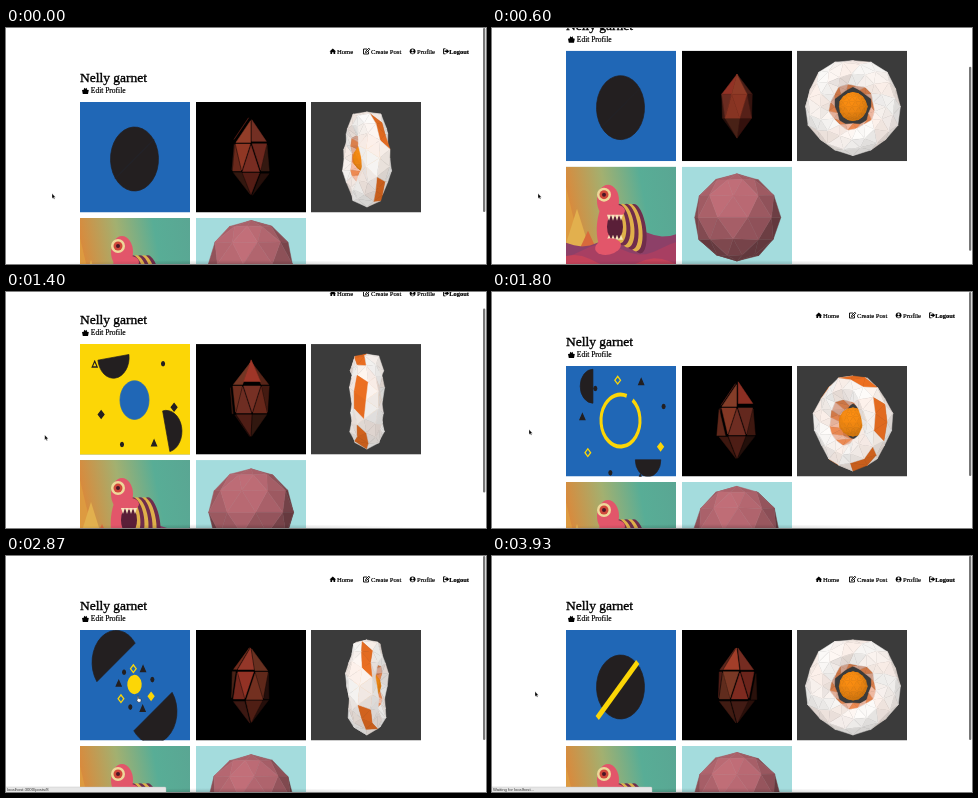
Write an HTML page with a canvas that moves like this. It is 480 px wide and 236 px high and loops after 4070 ms.

```html
<!DOCTYPE html>
<html lang="en">
<head>
<meta charset="utf-8">
<title>Profile page</title>
<style>
  html, body { margin: 0; width: 100%; height: 100%; overflow: hidden; background: #fff; }
  canvas, svg { position: absolute; left: 0; top: 0; }
  text { font: 6.6px "Liberation Serif", serif; stroke: #000; stroke-width: .2px; }
  .title { font-size: 13.5px; stroke-width: .35px; }
  .edit { font-size: 7.5px; }
  .bold { font-weight: bold; font-size: 6.4px; }
  .status { font: 4.2px "Liberation Sans", sans-serif; stroke: none; fill: #333; }
</style>
</head>
<body>
<canvas id="view" width="480" height="236"></canvas>
<svg width="480" height="236" viewBox="0 0 480 236">
  <defs>
    <radialGradient id="shade">
      <stop offset="0" stop-opacity=".2"/>
      <stop offset="1" stop-opacity="0"/>
    </radialGradient>
  </defs>
  <g id="page">
    <path d="M323.500 23.500l3.300-3 3.300 3h-.9V26h-1.700v-1.800h-1.400V26h-1.700v-2.500z"/>
    <text x="331" y="25.6">Home</text>
    <path d="M361 21h-3.500v5h5v-2.500M359.500 24.500l.3-1.300 3-3 1 1-3 3z" fill="none" stroke="#000" stroke-width=".9"/>
    <text x="365" y="25.6">Create Post</text>
    <circle cx="406.600" cy="23.300" r="2.900"/>
    <circle cx="406.600" cy="22.300" r="1.100" fill="#fff"/>
    <path d="M404.800 25q1.800-1.800 3.600 0-1.800 1.200-3.600 0" fill="#fff"/>
    <text x="411" y="25.6">Profile</text>
    <path d="M439.500 20.800h-2v5h2" fill="none" stroke="#000" stroke-width=".9"/>
    <path d="M438.500 22.500h2v-1.700l2.700 2.500-2.700 2.500v-1.700h-2z"/>
    <text class="bold" x="443.300" y="25.6">Logout</text>
    <text class="title" x="74" y="53.5">Nelly garnet</text>
    <path d="M76 62l1.800-.3.300-2 1.300 1 1.300-1 .3 2 1.800.3-.8 4h-5.200z"/>
    <text class="edit" x="84.800" y="65.3">Edit Profile</text>
  </g>
  <ellipse cx="228" cy="237" rx="200" ry="5" fill="url(#shade)"/>
  <rect id="thumb" x="477" width="2.300" height="184" rx="1.100" fill="#777"/>
  <g id="bar">
    <rect x="-1" y="231" width="161" height="6" rx="1" fill="#e6e6e6" stroke="#bbb" stroke-width=".4"/>
    <text id="status" class="status" x="1" y="235.200"></text>
  </g>
  <path id="arrow" d="M0-2.500v5l1.200-1 .8 1.700.8-.4-.8-1.600h1.500z" stroke="#fff" stroke-width=".3"/>
  <path id="hand" d="M-1.500-3h1v2.500l2.500.5v2l-.6 1.200h-2.300l-1.600-2.200.9-.4z" fill="#fff" stroke="#222" stroke-width=".5"/>
</svg>
<script>
const LOOP = 4070, FREEZE = 3740, SIDE = 110.5;
const YELLOW = '#fcd606', BLUE = '#2067b6', DARK = '#231f20';
const { sin, cos, PI, hypot, min, max } = Math, TAU = 2 * PI, DEG = PI / 180;
const $ = id => document.getElementById(id);
const ctx = $('view').getContext('2d');

const ramp = (t, from, to) => min(1, max(0, (t - from) / (to - from)));
const ease = (t, from, to) => { const f = ramp(t, from, to); return f * f * (3 - 2 * f); };
const random = n => { const v = sin(n * 127.1) * 43758.5; return v - Math.floor(v); };

// ---- Low-poly solids ----
function mesh(nu, nv, point, tint) {
  const tris = [];
  for (let j = 0; j < nv; j++) for (let i = 0; i < nu; i++) {
    const at = (a, b) => point(TAU * (i + a + (j + b) / 2) / nu, j + b);
    const color = tint(i, j);
    tris.push({ p: [at(0, 0), at(1, 0), at(0, 1)], color },
              { p: [at(1, 0), at(1, 1), at(0, 1)], color });
  }
  return tris;
}

function ball(r, nu, nv, wobble, color) {
  return mesh(nu, nv, (a, j) => {
    const b = PI * j / nv, q = r * (1 + wobble * sin(3 * a + 5 * b) * sin(b));
    return [q * sin(b) * cos(a), -q * cos(b), q * sin(b) * sin(a)];
  }, () => color);
}

function drawMesh(tris, x, y, turn, ambient, burst = 0) {
  const c = cos(turn), s = sin(turn), faces = [];
  for (const { p, color } of tris) {
    const mid = [0, 1, 2].map(k => (p[0][k] + p[1][k] + p[2][k]) / 3);
    const push = 1 + burst * (1 + .3 * sin(9 * mid[0] + 5 * mid[1]));
    const q = p.map(v => {
      const [px, py, pz] = v.map((n, k) => mid[k] * push + (n - mid[k]) * (1 + burst * .3));
      return [px * c + pz * s, py, pz * c - px * s];
    });
    const [u, v] = [q[1], q[2]].map(w => w.map((n, k) => n - q[0][k]));
    const n = [v[1] * u[2] - v[2] * u[1], v[2] * u[0] - v[0] * u[2], v[0] * u[1] - v[1] * u[0]];
    if (n[2] <= .01) continue;
    const light = max(0, (-.2 * n[0] - .55 * n[1] + .8 * n[2]) / hypot(...n));
    const k = min(1, ambient + (1 - ambient) * light);
    faces.push({ q, z: q[0][2] + q[1][2] + q[2][2], fill: `rgb(${color.map(w => w * k | 0)})` });
  }
  faces.sort((a, b) => a.z - b.z);
  ctx.lineWidth = .5;
  for (const { q, fill } of faces) {
    ctx.beginPath();
    for (const v of q) ctx.lineTo(x + v[0], y + v[1]);
    ctx.closePath();
    ctx.fillStyle = ctx.strokeStyle = fill;
    ctx.fill();
    ctx.stroke();
  }
}

const gem = mesh(6, 3, (a, j) => {
  const r = j % 3 ? 15.5 : 0;
  return [r * cos(a), [-32, -12, 12, 32][j], r * sin(a)];
}, (i, j) => [136 + 14 * ((i + j) % 3), 56 + 7 * (i % 2), 42]);

const RIM = 8;
const egg = [
  ...mesh(16, RIM, (a, j) => {
    const v = TAU * j / RIM, r = 33 + 14.5 * cos(v) + 1.5 * sin(5 * a + 3 * v);
    return [r * cos(a), r * sin(a), -15 * sin(v) + 2 * sin(4 * a - 2 * v)];
  }, (i, j) => {
    if (j === 0) return i % 3 ? [238, 112, 34] : [255, 246, 240];
    if (j === 3 || j === 4) return i % 2 ? [240, 140, 84] : [246, 190, 166];
    return [255, 253 - 5 * (i % 3), 251 - 7 * (i % 3)];
  }),
  ...ball(14, 12, 8, .02, [252, 142, 18])
];

const planet = ball(43.5, 9, 6, .02, [196, 112, 122]);

// ---- Flat shapes, squeezed horizontally ----
function squeezed(x, y, draw) {
  ctx.save();
  ctx.translate(x, y);
  ctx.scale(.75, 1);
  ctx.beginPath();
  draw();
  ctx.restore();
}

function paint(color, hollow, width = .8) {
  ctx.fillStyle = ctx.strokeStyle = color;
  ctx.lineWidth = width;
  if (!hollow) ctx.fill();
  ctx.stroke();
}

// Half disc, moved `dist` from the middle; angles in degrees
function half(dist, way, bulge, r) {
  squeezed(54.5 + .75 * dist * cos(way * DEG), 57 + dist * sin(way * DEG), () => {
    ctx.arc(0, 0, r, (bulge - 90) * DEG, (bulge + 90) * DEG);
    ctx.closePath();
    paint(DARK);
  });
}

function stick(x, y, k, width, color) {
  squeezed(x, y, () => {
    ctx.moveTo(-27 * k, 28 * k);
    ctx.lineTo(27 * k, -28 * k);
    paint(color, true, width);
  });
}

// Small polygons spread evenly around the middle
function scatter(count, seed, spread, accent) {
  for (let n = 0; n < count; n++) {
    const a = TAU * n / count - 1.66, d = spread * (42 + 22 * random(n + seed));
    const sides = [4, 3, 8][(n + seed) % 3], r = sides === 8 ? 2 : 3.8;
    squeezed(54.5 + .75 * d * cos(a), 56 + d * sin(a), () => {
      for (let i = 0; i < sides; i++) ctx.lineTo(r * sin(TAU * i / sides), -r * cos(TAU * i / sides));
      ctx.closePath();
      paint(n % 3 ? DARK : accent, n % 6 === 0, 1.5);
    });
  }
}

function shapes(t) {
  if (t > 3080) t -= 2840;
  const fly = ease(t, 905, 1060), spin = ease(t, 1060, 1800), home = ease(t, 1800, 2870);

  if (t > 905 && t < 1600) {
    stick(52, 57, 4, 6 + 300 * ramp(t, 905, 1030), YELLOW);
    if (t > 980) scatter(7, 4, 1, DARK);
    const k = .8 * (ease(t, 980, 1050) - ease(t, 1200, 1350));
    if (k > 0) stick(65, 50, k, 3.5, DARK);
    squeezed(54.5, 56, () => {
      ctx.arc(0, 0, 95 * ramp(t, 1350, 1600), 0, TAU);
      paint(BLUE);
    });
  }
  if (t > 1550) scatter(9, 0, (.6 + .4 * ease(t, 1550, 1800)) * (1 - ramp(t, 1800, 3080) ** 3), YELLOW);

  const dist = 52 * (fly - ease(t, 2740, 3080)), r = 32 - 8 * fly - 7 * spin + 15 * home;
  half(dist, 247 - 22 * spin, -127 + 132 * fly + 175 * spin + 53 * home, r);
  half(dist, 28 + 17 * spin, 53 - 148 * fly + 185 * spin - 37 * home, r);
  if (t > 820 && t <= 905) stick(51.5, 60, ramp(t, 820, 885), 6, YELLOW);

  // Ring that closes, fills up and shrinks away
  if (t > 1560) squeezed(54.5, 54.5, () => {
    const size = 28 * (1 - ease(t, 2550, 3080)), w = min(size, 4 + 24 * ramp(t, 1900, 2250));
    ctx.arc(0, 0, size - w / 2, -.9, -.9 + TAU * ramp(t, 1560, 1815));
    paint(YELLOW, true, w);
  });
}

// ---- Cartoon creature ----
function blob(x, y, rx, ry, color, tilt = 0) {
  ctx.beginPath();
  ctx.ellipse(x, y, rx, ry, tilt, 0, TAU);
  ctx.fillStyle = color;
  ctx.fill();
}

function spike(x, y, w, h, color) {
  ctx.beginPath();
  ctx.moveTo(x - w, y);
  ctx.lineTo(x, y - h);
  ctx.lineTo(x + w, y);
  ctx.fillStyle = color;
  ctx.fill();
}

function monster() {
  const pink = '#e2566a', maroon = '#6f2d4c', gold = '#dfb04a';
  const sky = ctx.createLinearGradient(0, 20, SIDE, 0);
  ['#d98a3c', '#a3b070', '#58ad96', '#5aa693'].forEach((color, i) => sky.addColorStop(i / 3, color));
  ctx.fillStyle = sky;
  ctx.fillRect(0, 0, SIDE, SIDE);
  ['#dd9a40', '#e2b04e', '#d8693c'].forEach((color, i) => spike(i * 11, 112, 22, 92 - 22 * i, color));
  ['#8d4068', '#a83f62', '#c4435a'].forEach((color, n) => {
    ctx.beginPath();
    ctx.moveTo(0, SIDE);
    for (let x = 0; x <= 112; x += 8) ctx.lineTo(x, 76 + 9 * n + 6 * sin(x / 13 + 2 * n) - x * (.12 - .08 * n));
    ctx.lineTo(112, SIDE);
    ctx.fillStyle = color;
    ctx.fill();
  });
  for (let i = 0; i < 6; i++) blob(71 - 4 * i, 62 - i, 9, 25 - i, i % 2 ? gold : maroon, -.15);
  blob(42, 58, 11, 27, pink, .1);
  blob(42, 34, 11, 16, pink);
  blob(49, 60, 8, 14, '#5a1f38');
  blob(50, 44, 9, 6, pink);
  for (let i = 0; i < 4; i++) {
    spike(43 + 4 * i, 48, 2, -6, '#f7e3bd');
    spike(43 + 4 * i, 73, 2, 5, '#f7e3bd');
  }
  blob(42, 80, 13, 8, pink, -.2);
  ['#eed89a', '#d0483a', '#4b1726'].forEach((color, i) => blob(38, 28, 7 - 2.5 * i, 7 - 2.5 * i, color));
}

function tile(x, y, color, draw) {
  ctx.save();
  ctx.translate(x, y);
  ctx.beginPath();
  ctx.rect(0, 0, 110, SIDE);
  ctx.clip();
  ctx.fillStyle = color;
  ctx.fillRect(0, 0, 110, SIDE);
  draw();
  ctx.restore();
}

function render(t) {
  const live = min(t, FREEZE);
  const scroll = 53 * (ease(t, 100, 660) - ease(t, 1150, 1600)), row = 74 - scroll;
  ctx.clearRect(0, 0, 480, 236);

  tile(74, row, BLUE, () => shapes(live));
  tile(190, row, '#000', () => {
    const burst = .28 * min(1, .9 * (1 - cos(TAU * (live - 600) / 1800)));
    drawMesh(gem, 55, 55.5, live * TAU / 5400, .25, burst);
  });
  tile(305, row, '#3b3b3b', () => drawMesh(egg, 56, 56, (live * .117 - 75) * DEG, .84));
  tile(74, row + 116, '#72b48c', monster);
  tile(190, row + 116, '#a4dcdd', () =>
    drawMesh(planet, 55, 50 - 4 * cos(TAU * live / 2140), live * TAU / 9000, .5));

  $('page').setAttribute('transform', `translate(0 ${-scroll})`);
  $('thumb').setAttribute('y', scroll * 40 / 53);

  const drift = ease(t, 1150, 1500), enter = ease(t, 1820, 2130), leave = ease(t, 3300, 3650);
  const x = 46 - 9 * drift + 96 * enter - 90 * leave, y = 168 - 28 * drift + 3 * enter - 5 * leave;
  for (const id of ['arrow', 'hand']) {
    $(id).setAttribute('transform', `translate(${x} ${y})`);
    $(id).style.display = (x > 74) === (id === 'hand') ? '' : 'none';
  }
  $('bar').style.display = t > 1950 ? '' : 'none';
  $('status').textContent = t < 3400 ? 'localhost:3000/posts/8' : 'Waiting for localhost...';
}

const start = performance.now();
function tick() {
  render((performance.now() - start) % LOOP);
  requestAnimationFrame(tick);
}
tick();
</script>
</body>
</html>
```
